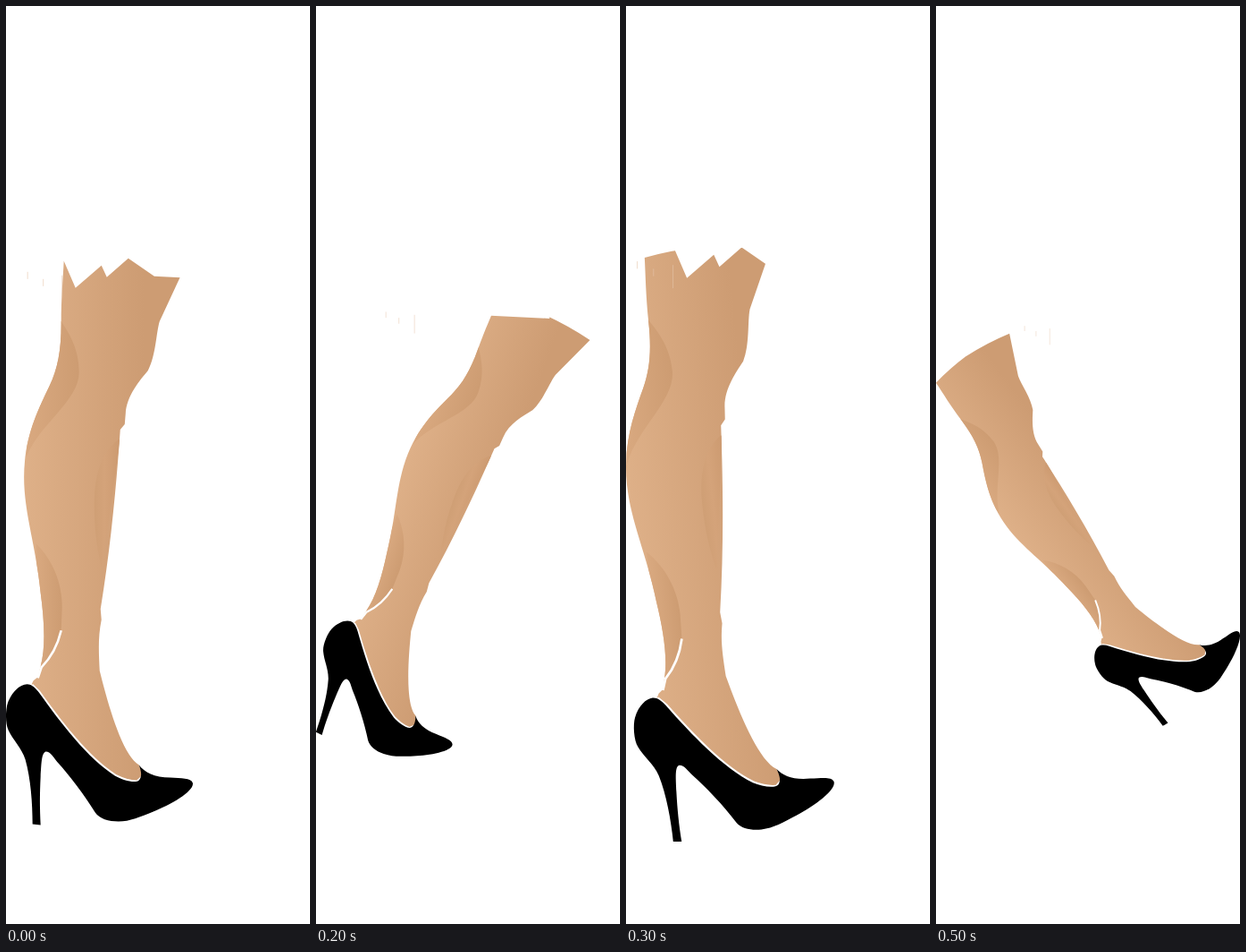
Recreate the animation shown at these times as an HTML page. Size 340 by 1025 pixels, loop 0.6 s.

```html
<!DOCTYPE html>
<html lang="en">
<head>
<meta charset="utf-8">
<title>Walking leg</title>
<style>
  html, body { margin: 0; width: 100%; height: 100%; overflow: hidden; background: #fff; }
  svg { display: block; width: 100%; height: 100%; }
</style>
</head>
<body>
<svg viewBox="0 0 340 1025">
  <defs>
    <linearGradient id="skin" gradientUnits="userSpaceOnUse" x1="20" y1="0" x2="155" y2="0">
      <stop offset="0" stop-color="#deb088"/>
      <stop offset="1" stop-color="#cd9c73"/>
    </linearGradient>
    <linearGradient id="shade">
      <stop offset="0" stop-color="#d9a980"/>
      <stop offset="1" stop-color="#cd9c72"/>
    </linearGradient>
    <linearGradient id="shin">
      <stop offset="0" stop-color="#cf9f75"/>
      <stop offset=".4" stop-color="#d4a37a"/>
      <stop offset="1" stop-color="#cc9a70"/>
    </linearGradient>
    <clipPath id="inside"><use href="#limb"/></clipPath>
  </defs>
  <g id="figure">
    <g id="leg">
      <path id="limb" fill="url(#skin)" d="M65 285 Q95 280 125 280 Q165 283 200 292 L172 352
        C168 365 168 390 159 407 C150 418 135 435 134 455 L133 467 L128 473
        C124 530 118 600 106 673 L107 685 C103 705 104 720 105 742
        C114 778 130 836 149 847 L153 858 L142 868 Q80 840 29 757 L31 753 L36 749 L39 737
        C45 715 43 685 39 655 C34 603 20.5 567 20.5 526 C20.5 482 36 451 49 424
        C58 405 62 385 62 355 C62 325 64 305 65 285Z"/>
      <g clip-path="url(#inside)" fill="url(#shade)">
        <path d="M62 352 C72 367 82 384 82 409 C82 441 37 467 23 504 V352Z"/>
        <path d="M34 600 C52 618 63 643 63 671 L62 698 Q56 719 40 736 H34Z"/>
        <path fill="url(#shin)" d="M126 484 C106 499 99 525 99 556 C99 585 102 605 107 627 L128 484Z"/>
      </g>
      <g fill="none" stroke="#fff">
        <path stroke-width="2.6" d="M62 697 C57 718 47 731 40 738 L36 750"/>
        <path stroke-width="4" d="M29 758 L37 766 C62 801 92 840 122 859 Q136 866 146 866"/>
      </g>
      <path id="shoe" d="M24 757 C29 757 33 761 37 766 C62 801 92 840 122 859 C131 864 145 868 149 864
        C153 859 151 853 149 847 C155 855 166 861 184 861 C196 862 207 861 209 867
        C211 876 185 891 165 899 C150 905 139 910 126 910 C115 910 105 907 100 900
        C88 880 70 857 58 844 C53 838 50 832 45 832 C40 833 40 845 39 860
        C38 880 38 895 39 914 L30 913 C30 890 28 862 22 841 C18 828 8 819 3 808
        C-1 800 0 783 3 776 C8 764 17 757 24 757Z"/>
    </g>
    <!-- White skirt with a ragged hem hides the top of the thigh -->
    <path fill="#fff" d="M62 200 V278 L78 315 L107 290 L113 303 L137 282 L166 302 L245 306 V200Z"/>
    <path stroke="#e6c5aa" stroke-width=".6" d="M24.5 297v8M42 305v8M63 301v25"/>
  </g>
</svg>
<script>
  const WIDTH = 340, HEIGHT = 1025, STEP = 100;
  const SKIRT_TOP = 111;
  const PIVOT = { x: 126, y: 600 };
  const TURNS = [0, 7.7, 19.7, -6, -21.3, -36.7];

  const get = id => document.getElementById(id);
  const figure = get("figure"), leg = get("leg");

  function outline(path) {
    const points = [];
    const length = path.getTotalLength();
    for (let d = 0; d < length; d += 1.5) points.push(path.getPointAtLength(d));
    return points;
  }
  const rim = [...outline(get("limb")), ...outline(get("shoe"))];

  // Turn the leg, then fit leg and skirt to the stage width, centred vertically.
  function makePose(turn) {
    const angle = turn * Math.PI / 180;
    const cos = Math.cos(angle), sin = Math.sin(angle);
    let left = WIDTH, right = WIDTH, bottom = 0;
    for (const point of rim) {
      const dx = point.x - PIVOT.x, dy = point.y - PIVOT.y;
      const x = PIVOT.x + dx * cos - dy * sin;
      left = Math.min(left, x);
      right = Math.max(right, x);
      bottom = Math.max(bottom, PIVOT.y + dx * sin + dy * cos);
    }
    const size = WIDTH / (right - left);
    const top = HEIGHT / 2 - size * (SKIRT_TOP + bottom) / 2;
    return {
      fit: `translate(${-left * size} ${top}) scale(${size})`,
      turn: `rotate(${turn} ${PIVOT.x} ${PIVOT.y})`
    };
  }
  const poses = TURNS.map(makePose);

  const start = performance.now();
  let shown = -1;
  function tick() {
    const step = Math.floor((performance.now() - start) / STEP) % poses.length;
    if (step !== shown) {
      shown = step;
      figure.setAttribute("transform", poses[step].fit);
      leg.setAttribute("transform", poses[step].turn);
    }
    requestAnimationFrame(tick);
  }
  tick();
</script>
</body>
</html>
```
